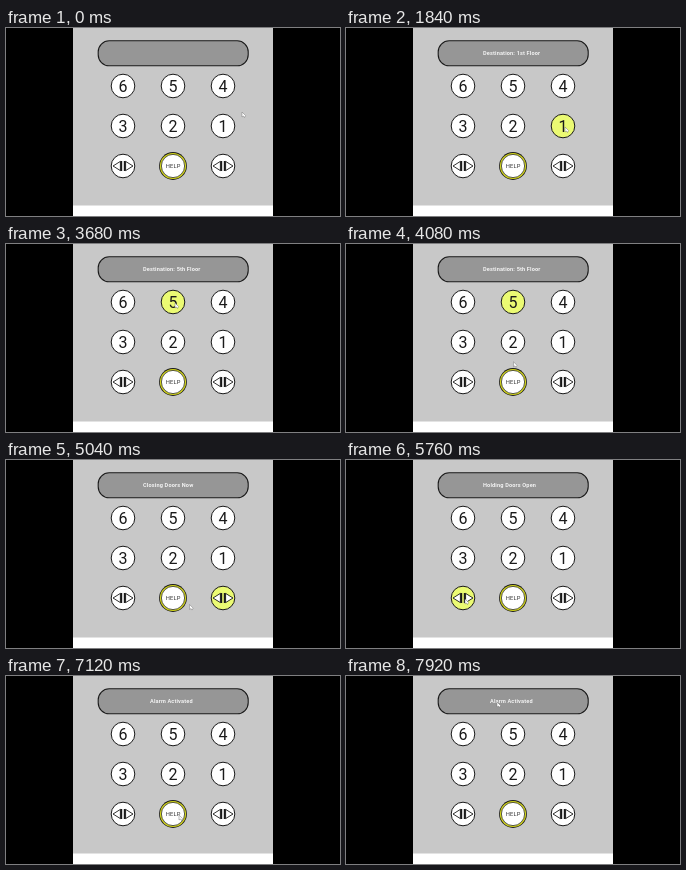
These frames come from a looping animation (334x188 px, 8000 ms). An HTML page with a canvas:

```html
<!DOCTYPE html>
<html lang="en">
<head>
<meta charset="utf-8">
<title>Elevator panel</title>
<style>
html, body { margin: 0; width: 100%; height: 100%; overflow: hidden; background: #000; }
canvas { display: block; width: 100vw; height: 100vh; }
</style>
</head>
<body>
<canvas id="stage"></canvas>
<script>
const W = 334, H = 188, LOOP = 8000;
const canvas = document.getElementById('stage');
const ctx = canvas.getContext('2d');
const FONT = 'Roboto, "Open Sans", sans-serif';
const LIT = '#ebfa73', HOVER = '#e5e3e3', INK = '#1a1a1a';

const buttons = ['6', '5', '4', '3', '2', '1', 'open', 'help', 'close'].map((id, i) => ({
  id, x: 117 + 50 * (i % 3), y: 58 + 40 * Math.floor(i / 3)
}));
const spot = id => {
  const { x, y } = buttons.find(b => b.id === id);
  return { x: x + 2, y: y + 1 };
};

const states = [
  { at: 0, lit: '', text: '' },
  { at: 1400, lit: '1', text: 'Destination: 1st Floor' },
  { at: 3200, lit: '5', text: 'Destination: 5th Floor' },
  { at: 4820, lit: 'close', text: 'Closing Doors Now' },
  { at: 5520, lit: 'open', text: 'Holding Doors Open' },
  { at: 7000, lit: '', text: 'Alarm Activated', indent: 7 }
];

// Each move is a curve; bend pushes its middle sideways.
const start = { x: 236, y: 84 };
const moves = [
  { at: 400, span: 650, to: spot('1'), bend: 0 },
  { at: 2200, span: 600, to: spot('5'), bend: 0 },
  { at: 3850, span: 450, to: spot('close'), bend: 65 },
  { at: 4820, span: 550, to: spot('open'), bend: -12 },
  { at: 5900, span: 700, to: { x: 173, y: 139 }, bend: 36 },
  { at: 7250, span: 600, to: { x: 151, y: 26 }, bend: 0 }
];

const ease = u => u * u * (3 - 2 * u);

function curve(a, b, bend, u) {
  const dx = b.x - a.x, dy = b.y - a.y, len = Math.hypot(dx, dy);
  const push = 2 * u * (1 - u) * bend / len;
  return { x: a.x + dx * u - dy * push, y: a.y + dy * u + dx * push };
}

function pointerAt(t) {
  let from = start;
  for (const { at, span, to, bend } of moves) {
    if (t < at) break;
    if (t < at + span) return curve(from, to, bend, ease((t - at) / span));
    from = to;
  }
  return from;
}

function disc(x, y, r, fill, stroke, width) {
  ctx.beginPath();
  ctx.arc(x, y, r, 0, Math.PI * 2);
  ctx.fillStyle = fill;
  ctx.fill();
  if (!stroke) return;
  ctx.strokeStyle = stroke;
  ctx.lineWidth = width;
  ctx.stroke();
}

function label(text, x, y, size, weight, color, align = 'center') {
  ctx.font = `${weight} ${size}px ${FONT}`;
  ctx.letterSpacing = size < 10 ? '0.15px' : '0px';
  ctx.fillStyle = color;
  ctx.textAlign = align;
  ctx.fillText(text, x, y);
}

function doorIcon(x, y) {
  ctx.strokeStyle = ctx.fillStyle = INK;
  for (const side of [-1, 1]) {
    ctx.beginPath();
    ctx.moveTo(x + side * 10, y);
    ctx.lineTo(x + side * 2.6, y - 4.6);
    ctx.lineTo(x + side * 2.6, y + 4.6);
    ctx.closePath();
    ctx.fillStyle = '#fff';
    ctx.fill();
    ctx.lineWidth = 0.9;
    ctx.stroke();
    ctx.fillStyle = INK;
    ctx.fillRect(x + side * 1.7 - 0.9, y - 5, 1.8, 10);
  }
}

function drawButton({ id, x, y }, lit, hover) {
  if (id === 'help') {
    disc(x, y, 13.9, INK);
    disc(x, y, 13.1, '#d3d51c');
    disc(x, y, 11.6, '#fff', INK, 0.7);
    label('HELP', x + 0.1, y + 2.2, 5.8, 400, '#333');
    return;
  }
  disc(x, y, 11.8, id === lit ? LIT : hover ? HOVER : '#fff', INK, 1);
  if (id.length > 1) doorIcon(x, y);
  else label(id, x, y + 5.8, 16, 400, INK);
}

function drawPointer({ x, y }) {
  ctx.beginPath();
  ctx.moveTo(x, y);
  ctx.lineTo(x, y + 5);
  ctx.lineTo(x + 1.5, y + 4);
  ctx.lineTo(x + 2.5, y + 5.6);
  ctx.lineTo(x + 3.6, y + 3.6);
  ctx.closePath();
  ctx.fillStyle = '#fff';
  ctx.fill();
  ctx.strokeStyle = '#777';
  ctx.lineWidth = 0.5;
  ctx.stroke();
}

function drawDisplay({ text, indent = 0 }) {
  ctx.beginPath();
  ctx.roundRect(92.2, 12.8, 150, 25, 11);
  ctx.fillStyle = '#969696';
  ctx.fill();
  ctx.strokeStyle = INK;
  ctx.lineWidth = 1.1;
  ctx.stroke();
  label(text, 137 + indent, 27.4, 5.6, 700, '#f4f4f4', 'left');
}

function draw(t) {
  const state = states.filter(s => s.at <= t).pop();
  const pointer = pointerAt(t);
  ctx.fillStyle = '#000';
  ctx.fillRect(0, 0, W, H);
  ctx.fillStyle = '#fff';
  ctx.fillRect(67, 0, 200, H);
  ctx.fillStyle = '#c8c8c8';
  ctx.fillRect(67, 0, 200, 177.5);

  drawDisplay(state);
  for (const b of buttons) {
    drawButton(b, state.lit, Math.hypot(pointer.x - b.x, pointer.y - b.y) < 12);
  }
  drawPointer(pointer);
}

function frame(now) {
  const dpr = window.devicePixelRatio || 1;
  const w = Math.round(innerWidth * dpr), h = Math.round(innerHeight * dpr);
  if (canvas.width !== w || canvas.height !== h) {
    canvas.width = w;
    canvas.height = h;
  }
  ctx.setTransform(w / W, 0, 0, h / H, 0, 0);
  draw(now % LOOP);
  requestAnimationFrame(frame);
}
requestAnimationFrame(frame);
</script>
</body>
</html>
```
